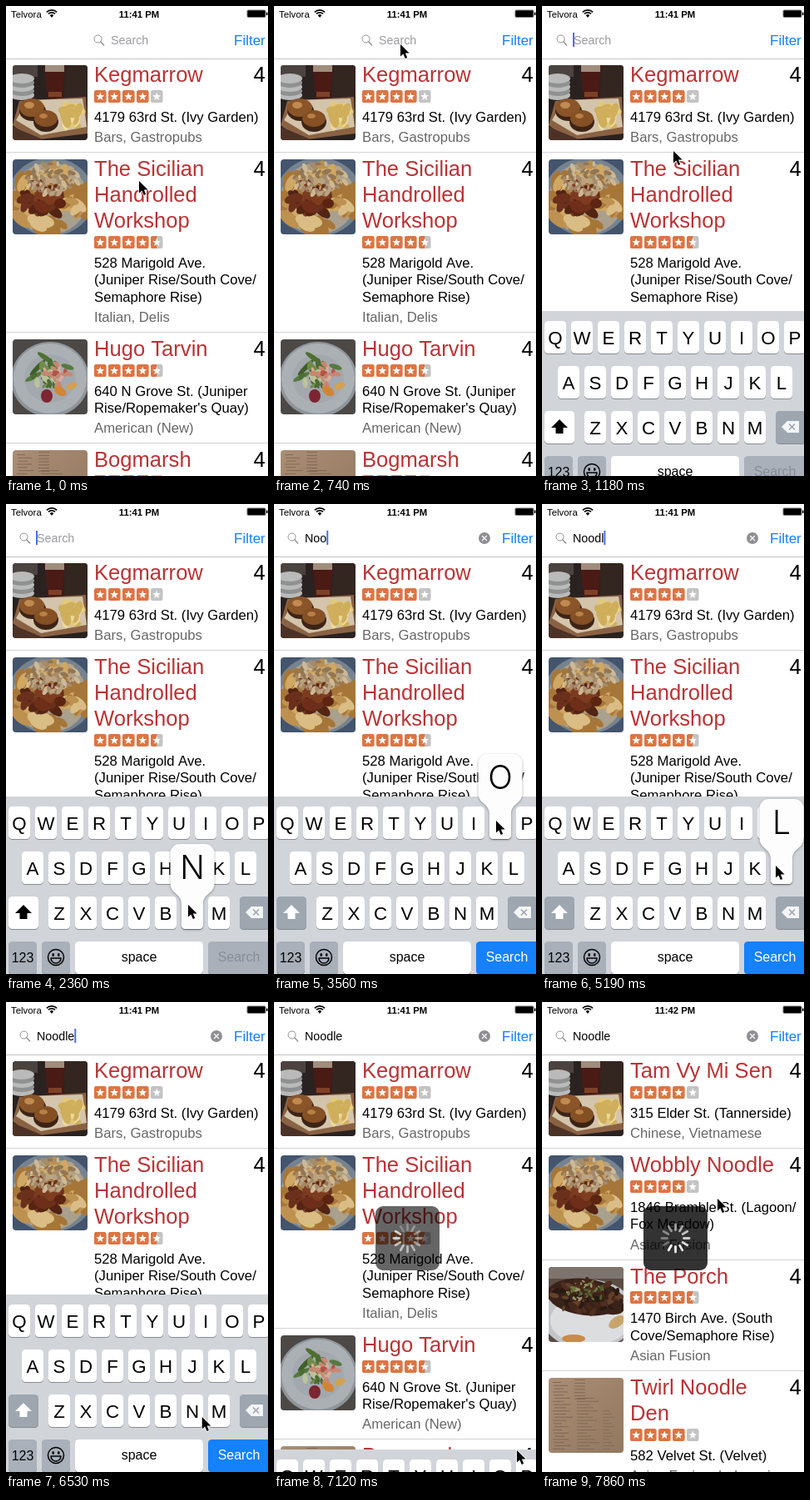
Animation of 315x564 px, one loop 8 s. Source, as an HTML page with a canvas:

```html
<!DOCTYPE html>
<html lang="en">
<head>
<meta charset="utf-8">
<title>Restaurant search</title>
<style>
html, body { margin: 0; width: 100%; height: 100%; overflow: hidden; background: #fff; }
canvas { display: block; width: 315px; height: 564px; }
</style>
</head>
<body>
<canvas id="stage"></canvas>
<script>
const W = 315, H = 564, LOOP = 8000, STEP = LOOP / 54;
const FONT = '"Liberation Sans", Arial, sans-serif';
const THIN = 'Inter, "Liberation Sans", sans-serif';
const canvas = document.getElementById('stage');
const ratio = window.devicePixelRatio || 1;
canvas.width = W * ratio;
canvas.height = H * ratio;
const g = canvas.getContext('2d');

// ---------- helpers ----------
function text(str, x, y, size, color, align = 'left', weight = '', family = FONT) {
  g.font = `${weight} ${size}px ${family}`;
  g.textAlign = align;
  g.fillStyle = color;
  g.fillText(str, x, y);
}
function rect(x, y, w, h, color) {
  g.fillStyle = color;
  g.fillRect(x, y, w, h);
}
function round(x, y, w, h, r, color) {
  g.beginPath();
  g.roundRect(x, y, w, h, r);
  g.fillStyle = color;
  g.fill();
}
function oval(x, y, rx, ry, color, turn = 0) {
  g.beginPath();
  g.ellipse(x, y, rx, ry, turn, 0, 7);
  g.fillStyle = color;
  g.fill();
}
function line(x1, y1, x2, y2, width, color, cap = 'round') {
  g.beginPath();
  g.moveTo(x1, y1);
  g.lineTo(x2, y2);
  g.lineWidth = width;
  g.lineCap = cap;
  g.strokeStyle = color;
  g.stroke();
}
function poly(points, color) {
  g.beginPath();
  points.forEach(([x, y]) => g.lineTo(x, y));
  g.closePath();
  g.fillStyle = color;
  g.fill();
}
function scatter(seed, count, cx, cy, rx, ry, size, colors) {
  const rnd = () => (seed = seed * 16807 % 2147483647) / 2147483647;
  rnd();
  for (let i = 0; i < count; i++) {
    const a = rnd() * 6.283, d = Math.sqrt(rnd());
    const s = size * (0.5 + rnd());
    oval(cx + Math.cos(a) * d * rx, cy + Math.sin(a) * d * ry, s, s * 0.5,
      colors[Math.floor(rnd() * colors.length)], rnd() * 3);
  }
}

// ---------- dish pictures, 90 x 90 ----------
const dishes = {
  buns() {
    rect(0, 0, 90, 90, '#2a2220');
    rect(0, 0, 30, 14, '#4b4340');
    rect(62, 0, 28, 40, '#33251f');
    for (let i = 0; i < 5; i++) oval(11, 36 - i * 5, 15, 6, i % 2 ? '#8f9090' : '#b9bab9');
    poly([[38, 0], [63, 0], [60, 40], [42, 40]], '#4a1a15');
    rect(39, 0, 23, 8, '#a08d7c');
    rect(43, 32, 16, 6, '#7d4128');
    poly([[8, 43], [88, 38], [90, 82], [24, 90], [0, 72]], '#8a6243');
    poly([[18, 42], [84, 40], [89, 74], [34, 84], [4, 66]], '#d3c4ab');
    oval(24, 55, 16, 12, '#3d2416');
    oval(23, 51, 15, 11, '#8a5529');
    oval(20, 48, 6, 4, '#c08a52');
    oval(40, 68, 15, 12, '#3d2416');
    oval(40, 64, 14, 10, '#845024');
    oval(37, 61, 5, 3, '#b87f45');
    scatter(9, 18, 73, 63, 13, 13, 8, ['#e2c878', '#ecd99b', '#cfae5c']);
    poly([[0, 74], [34, 88], [34, 90], [0, 90]], '#4c3226');
  },
  pasta() {
    rect(0, 0, 90, 90, '#43546d');
    oval(46, 45, 52, 47, '#76838f');
    oval(45, 47, 45, 43, '#a9a08d');
    scatter(21, 64, 45, 50, 42, 38, 12, ['#bd9150', '#d0a763', '#a67638', '#d9bd85']);
    scatter(5, 28, 38, 47, 26, 20, 8, ['#6b301c', '#7d3b20', '#532414']);
    scatter(33, 80, 48, 23, 31, 18, 4, ['#b9a281', '#cdb997', '#937653', '#a58b69']);
    oval(35, 57, 10, 7, '#6f2e19', 0.4);
    oval(57, 53, 7, 6, '#5c2411');
  },
  salad() {
    rect(0, 0, 90, 90, '#4b4846');
    oval(45, 48, 47, 45, '#8f9499');
    oval(45, 47, 44, 42, '#abb0b5');
    oval(45, 47, 31, 29, '#a3a8ae');
    oval(39, 22, 11, 3, '#4f7030', 0.6);
    oval(30, 34, 13, 3, '#3f5f2b', -0.8);
    oval(25, 45, 11, 3, '#56793c', -0.5);
    scatter(14, 28, 43, 42, 20, 15, 5, ['#708c4a', '#bcc29a', '#4b6c33']);
    scatter(17, 20, 52, 42, 17, 13, 3.5, ['#c98673', '#b75246', '#ddaa98']);
    oval(41, 68, 7, 8, '#7d2530');
    oval(57, 62, 8, 5, '#d08536', 0.6);
    oval(71, 56, 7, 4, '#d3a14f', -0.4);
    oval(66, 33, 8, 3, '#56793c', 0.3);
  },
  menu() {
    const fade = g.createLinearGradient(0, 0, 90, 90);
    fade.addColorStop(0, '#aa8d75');
    fade.addColorStop(1, '#92785f');
    rect(0, 0, 90, 90, fade);
    g.globalAlpha = 0.5;
    for (let i = 0; i < 22; i++) {
      const y = 5 + i * 3.8;
      rect(5 + i % 3, y, 10 + i * 7 % 13, 1, '#5e4a3d');
      if (i > 4) rect(34, y, 12 + i * 5 % 16, 1, '#66503f');
      if (i < 7) rect(31, y - 3, 13, 1, '#5e4a3d');
      if (i > 8) rect(65, y, 8 + i * 3 % 9, 1, '#735c4a');
    }
    g.globalAlpha = 1;
  },
  steak() {
    rect(0, 0, 90, 90, '#5a4c44');
    rect(0, 0, 90, 14, '#7d746d');
    oval(48, 57, 57, 42, '#c3c5c9');
    oval(50, 64, 48, 30, '#dcdddf');
    oval(44, 36, 46, 22, '#38221a', 0.12);
    oval(70, 44, 22, 12, '#38221a', 0.3);
    scatter(6, 70, 44, 36, 42, 19, 5, ['#4f2f20', '#2b1913', '#634029', '#432719']);
    scatter(11, 44, 45, 29, 22, 13, 2.2, ['#6c7840', '#9c9468', '#4e5f2e']);
    oval(82, 66, 11, 6, '#c8a56d', -0.6);
    oval(30, 86, 14, 5, '#c98b4a');
  }
};

// ---------- list ----------
const before = [
  ['buns', ['Kegmarrow'], 4, ['4179 63rd St. (Ivy Garden)'], 'Bars, Gastropubs'],
  ['pasta', ['The Sicilian', 'Handrolled', 'Workshop'], 4.5,
    ['528 Marigold Ave.', '(Juniper Rise/South Cove/', 'Semaphore Rise)'], 'Italian, Delis'],
  ['salad', ['Hugo Tarvin'], 4.5, ['640 N Grove St. (Juniper', 'Rise/Ropemaker\'s Quay)'], 'American (New)'],
  ['menu', ['Bogmarsh'], 4, ['27 Orchard St.'], 'American (New)']
];
const after = [
  ['buns', ['Tam Vy Mi Sen'], 4, ['315 Elder St. (Tannerside)'], 'Chinese, Vietnamese'],
  ['pasta', ['Wobbly Noodle'], 4, ['1846 Bramble St. (Lagoon/', 'Fox Meadow)'], 'Asian Fusion'],
  ['steak', ['The Porch'], 4.5, ['1470 Birch Ave. (South', 'Cove/Semaphore Rise)'], 'Asian Fusion'],
  ['menu', ['Twirl Noodle', 'Den'], 4, ['582 Velvet St. (Velvet)'], 'Asian Fusion, Indonesian']
];

function stars(x, y, score) {
  for (let i = 0; i < 5; i++) {
    const sx = x + i * 17, fill = Math.max(0, Math.min(1, score - i));
    round(sx, y, 14.5, 15, 2.5, '#c3c3c3');
    if (fill) round(sx, y, 14.5 * fill, 15, fill < 1 ? [2.5, 0, 0, 2.5] : 2.5, '#dd7442');
    const points = [];
    for (let k = 0; k < 10; k++) {
      const a = k * Math.PI / 5 - Math.PI / 2, r = k % 2 ? 2.2 : 5.2;
      points.push([sx + 7.25 + r * Math.cos(a), y + 7.8 + r * Math.sin(a)]);
    }
    poly(points, '#fff');
  }
}

function list(rows) {
  let top = 63;
  for (const [dish, title, score, address, kind] of rows) {
    g.save();
    g.translate(8, Math.round(top + 8.3));
    g.beginPath();
    g.roundRect(0, 0, 90, 90, 4);
    g.clip();
    dishes[dish]();
    g.restore();
    let y = top + 28.3;
    text('4', 297.5, y, 25.6, '#000');
    title.forEach((s, i) => text(s, 106, y + i * 31, 25.6, '#b93335'));
    y += (title.length - 1) * 31;
    stars(106, Math.round(y + 9.7), score);
    y += 47.7;
    address.forEach((s, i) => text(s, 106, y + i * 20.2, 16.7, '#000'));
    y += (address.length - 1) * 20.2 + 24.3;
    text(kind, 106, y, 16.7, '#666');
    top = y + 12.8;
    rect(0, Math.round(top - 0.8), W, 1, '#d2d1d5');
  }
}

// ---------- top bars ----------
function statusBar(clock) {
  text('Telvora', 6, 14, 11.4, '#000');
  for (const r of [8.6, 5.7]) {
    g.beginPath();
    g.arc(55, 13.5, r, -Math.PI * 0.75, -Math.PI * 0.25);
    g.lineWidth = 1.7;
    g.lineCap = 'butt';
    g.strokeStyle = '#000';
    g.stroke();
  }
  g.beginPath();
  g.moveTo(55, 14);
  g.arc(55, 13.5, 3.2, -Math.PI * 0.75, -Math.PI * 0.25);
  g.fillStyle = '#000';
  g.fill();
  text(clock, 160, 14, 11.3, '#000', 'center', 'bold');
  round(289.5, 4.5, 23, 9.5, 2, 'rgba(0,0,0,.55)');
  round(290.5, 5.5, 21, 7.5, 1, '#000');
  round(313, 7.5, 1.5, 3.5, 0.5, '#000');
}

function searchBar(slide, typed, caret) {
  const x = 126 - 89 * slide;
  g.beginPath();
  g.arc(x - 15.5, 39.5, 4.5, 0, 7);
  g.lineWidth = 1;
  g.strokeStyle = '#8e8e93';
  g.stroke();
  line(x - 12.3, 42.8, x - 8.3, 47, 1.3, '#8e8e93');
  text(typed || 'Search', x, 46, 14.3, typed ? '#000' : '#9a9a9f');
  if (caret) rect(x + (typed ? g.measureText(typed).width : -1), 32, 2, 17, '#4a71e8');
  if (typed) {
    oval(253, 41, 7, 7, '#8e8e93');
    line(250.5, 38.5, 255.5, 43.5, 1.2, '#fff');
    line(255.5, 38.5, 250.5, 43.5, 1.2, '#fff');
  }
  text('Filter', 274, 47, 17, '#147efb');
  rect(0, 63, W, 1, '#c4c3c8');
}

// ---------- keyboard ----------
const letterRows = [['QWERTYUIOP', 16], ['ASDFGHJKL', 32], ['ZXCVBNM', 64]];

function keyCap(x, y, w, color = '#fff') {
  round(x, y + 1, w, 39, 4.5, '#888b90');
  round(x, y, w, 39, 4.5, color);
}

function bubble(cx, y, ch) {
  const top = y - 63, neck = y - 16, foot = y + 39;
  g.save();
  g.beginPath();
  g.moveTo(cx - 16, top);
  g.arcTo(cx + 26.5, top, cx + 26.5, neck, 11);
  g.lineTo(cx + 26.5, neck);
  g.bezierCurveTo(cx + 26.5, y - 3, cx + 13, y - 4, cx + 13, y + 9);
  g.arcTo(cx + 13, foot, cx, foot, 4.5);
  g.arcTo(cx - 13, foot, cx - 13, y + 9, 4.5);
  g.lineTo(cx - 13, y + 9);
  g.bezierCurveTo(cx - 13, y - 4, cx - 26.5, y - 3, cx - 26.5, neck);
  g.arcTo(cx - 26.5, top, cx, top, 11);
  g.closePath();
  g.shadowColor = 'rgba(0,0,0,.35)';
  g.shadowBlur = 3 * ratio;
  g.shadowOffsetY = ratio;
  g.fillStyle = '#fdfdfd';
  g.fill();
  g.restore();
  text(ch, cx, y - 21, 39, '#000', 'center', 300, THIN);
}

function keyboard(top, typing, pressed) {
  const dim = '#a9b0ba', shade = '#9ea6b0';
  rect(0, top, W, H - top, '#d1d5da');
  let popup;
  letterRows.forEach(([chars, x0], r) => {
    const y = top + 12 + r * 54;
    [...chars].forEach((ch, i) => {
      const cx = x0 + i * 32;
      keyCap(cx - 13, y, 26);
      text(ch, cx, y + 27.5, 22.3, '#000', 'center');
      if (ch === pressed) popup = [cx, y, ch];
    });
  });

  let y = top + 120;
  keyCap(3, y, 36, typing ? shade : '#fff');
  poly([[21, 10], [31, 20], [25.5, 20], [25.5, 27], [16.5, 27], [16.5, 20], [11, 20]]
    .map(([px, py]) => [px, y + py]), typing ? '#fff' : '#000');
  keyCap(281, y, 36, shade);
  poly([[288, 19], [295, 12], [309, 12], [309, 26], [295, 26]]
    .map(([px, py]) => [px, y + py]), '#f4f5f6');
  line(297.5, y + 16, 303.5, y + 22, 1.6, shade);
  line(303.5, y + 16, 297.5, y + 22, 1.6, shade);

  y = top + 174;
  keyCap(3, y, 34, dim);
  text('123', 20, y + 25, 16, '#000', 'center');
  keyCap(43, y, 34, dim);
  g.lineWidth = 1.5;
  g.strokeStyle = '#000';
  g.beginPath();
  g.arc(60, y + 19, 9.5, 0, 7);
  g.stroke();
  oval(56.7, y + 16, 1.3, 2, '#000');
  oval(63.3, y + 16, 1.3, 2, '#000');
  g.beginPath();
  g.arc(60, y + 20, 6, 0, Math.PI);
  g.closePath();
  g.stroke();
  keyCap(83, y, 154);
  text('space', 160, y + 24, 16, '#000', 'center');
  keyCap(243, y, 76, typing ? '#1581fb' : dim);
  text('Search', 280, y + 24, 16, typing ? '#fff' : '#878d96', 'center');
  if (popup) bubble(...popup);
}

// ---------- loading box and pointer ----------
function loader(alpha, turn) {
  round(122, 245, 77, 77, 9, `rgba(0,0,0,${alpha})`);
  for (let i = 0; i < 12; i++) {
    const a = i * Math.PI / 6, c = Math.cos(a), s = Math.sin(a);
    const glow = 0.3 + 0.7 * ((i - turn + 24) % 12) / 11;
    line(160.5 + 10 * c, 283.5 + 10 * s, 160.5 + 16.5 * c, 283.5 + 16.5 * s, 2.8,
      `rgba(255,255,255,${glow * Math.min(1, alpha * 1.25)})`);
  }
}

function pointer(x, y) {
  g.beginPath();
  [[0, 0], [0, 14.5], [3.4, 11.4], [5.8, 17], [8.2, 16], [5.9, 10.5], [10.6, 10.5]]
    .forEach(([px, py]) => g.lineTo(x + px, y + py));
  g.closePath();
  g.lineJoin = 'round';
  g.lineWidth = 1.6;
  g.strokeStyle = '#fff';
  g.stroke();
  g.fillStyle = '#000';
  g.fill();
}

// ---------- timeline, in steps of about 148 ms ----------
const path = [
  [0, 160, 210], [5, 152, 46], [6, 152, 46], [8, 158, 174], [13, 220, 479], [16, 219, 481],
  [18, 219, 481], [20, 267, 381], [24, 267, 380], [28, 24, 438], [30, 91, 438], [32, 91, 438],
  [34, 281, 434], [36, 281, 434], [39, 48, 392], [40, 75, 381], [42, 75, 381],
  [45, 292, 539], [48, 292, 538], [53, 211, 236]
];
const presses = [['N', 15, 16], ['O', 20, 20], ['O', 23, 24], ['D', 31, 31], ['L', 34, 35], ['E', 41, 41]];
const strokes = [17, 21, 24, 32, 35, 42];
const SHOW = 950, HIDE = 6915, RESULTS = 53;

function pointerAt(n) {
  const i = Math.max(1, path.findIndex(p => p[0] >= n));
  const [n0, x0, y0] = path[i - 1], [n1, x1, y1] = path[i];
  const u = (n - n0) / (n1 - n0), e = u * u * (3 - 2 * u);
  return [x0 + (x1 - x0) * e, y0 + (y1 - y0) * e];
}
// share left of a critically damped spring
function spring(ms) {
  const k = Math.max(0, ms) * 0.01826;
  return Math.exp(-k) * (1 + k);
}

function draw(n) {
  const t = n * STEP;
  const count = strokes.filter(s => s <= n).length;
  const press = presses.find(p => n >= p[1] && n <= p[2]);
  const up = spring(t - SHOW), down = 1 - spring(t - HIDE);
  const since = count ? t - strokes[count - 1] * STEP : t - 1030;
  const caret = n >= 7 && t < HIDE && since % 880 < 500;

  g.setTransform(ratio, 0, 0, ratio, 0, 0);
  rect(0, 0, W, H, '#fff');
  list(n >= RESULTS ? after : before);
  rect(0, 0, W, 63, '#fff');
  statusBar(n >= 52 ? '11:42 PM' : '11:41 PM');
  searchBar(1 - Math.pow(up, 1.7), 'Noodle'.slice(0, count), caret);
  // twelve spokes per second
  if (t > HIDE) loader(0.8 * Math.min(1, (t - HIDE) / 260), (Math.floor(t * 0.012) + 7) % 12);
  const top = 351 + 213 * Math.max(up, down);
  if (top < H - 0.5) keyboard(Math.round(top), count > 0, press && press[0]);
  pointer(...pointerAt(n));
}

let last = -1;
function tick() {
  const t = performance.now() % LOOP;
  const n = Math.min(53, Math.floor((t + 12) / STEP));
  if (n !== last) draw(last = n);
  requestAnimationFrame(tick);
}
tick();
</script>
</body>
</html>
```
